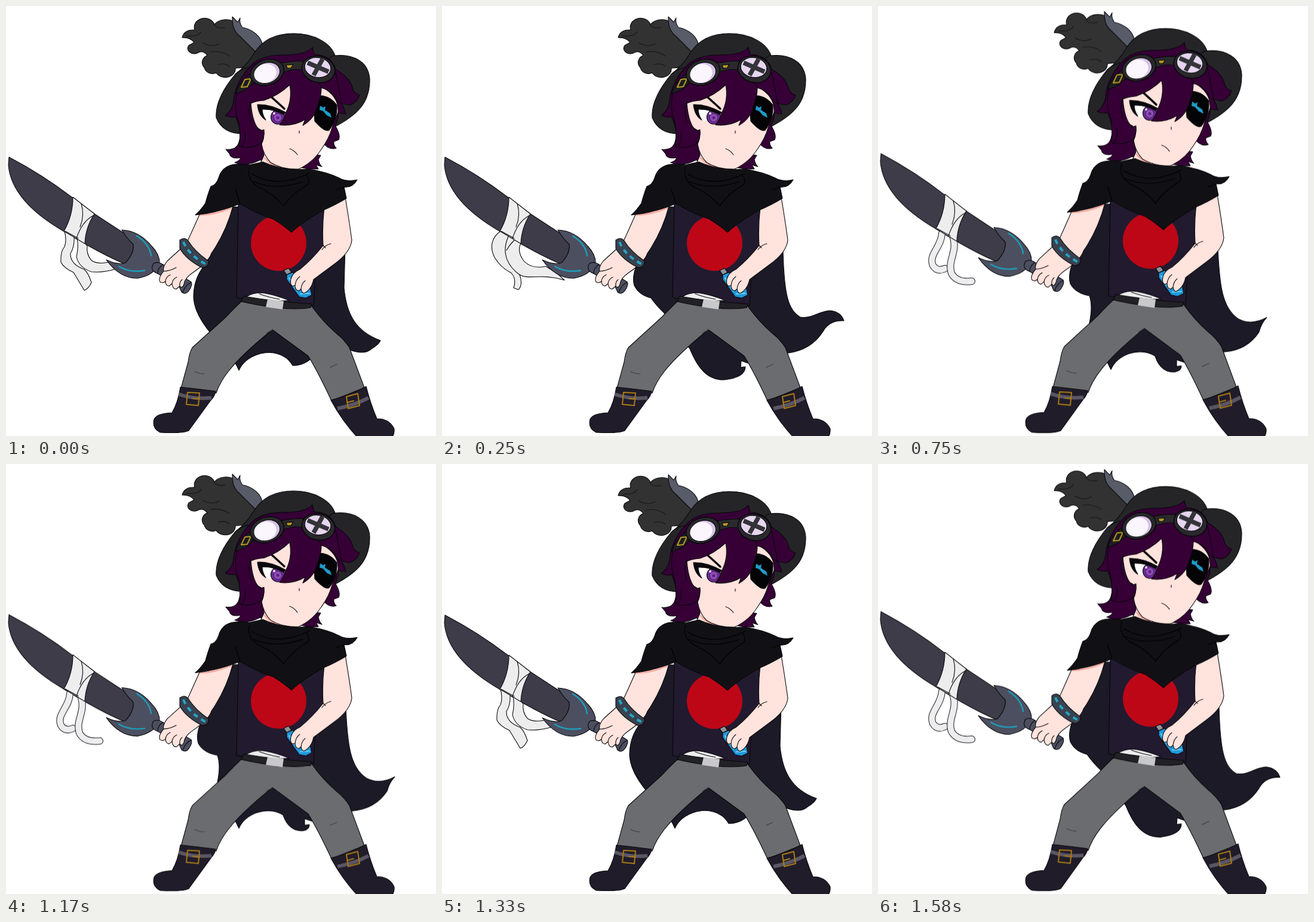
An HTML page that plays this animation: 720x720 px, repeating every 2010 ms.

```html
<!DOCTYPE html>
<html lang="en">
<head>
<meta charset="utf-8">
<title>Swordsman idle</title>
<style>
  html, body { margin: 0; width: 100%; height: 100%; overflow: hidden; background: #fff; }
  svg { display: block; width: 100%; height: 100%; }

  /* Every pose is held, then switched at once. */
  #figure, .pose { animation: 2010ms step-end infinite; }
  #figure { transform-origin: 0 720px; animation-name: breathe; }
  #cape-rest, #ribbon-rest { animation-name: rest; }
  #cape-gust { animation-name: cape-gust; }
  #cape-settle { animation-name: cape-settle; }
  #ribbon-gust { animation-name: ribbon-gust; }
  #ribbon-hang { animation-name: ribbon-hang; }

  @keyframes breathe {
    0% { transform: scaleY(1); }
    24.876% { transform: scaleY(1.0124); }
    58.209% { transform: scaleY(1.0014); }
    62.189% { transform: scaleY(1); }
    78.607%, 100% { transform: scaleY(1.0124); }
  }
  @keyframes rest {
    0%, 66.169% { opacity: 1; }
    12.438%, 78.607%, 100% { opacity: 0; }
  }
  @keyframes cape-gust {
    0%, 37.313% { opacity: 0; }
    12.438%, 78.607%, 100% { opacity: 1; }
  }
  @keyframes cape-settle {
    0%, 66.169%, 100% { opacity: 0; }
    37.313% { opacity: 1; }
  }
  @keyframes ribbon-gust {
    0%, 24.876%, 100% { opacity: 0; }
    12.438% { opacity: 1; }
  }
  @keyframes ribbon-hang {
    0%, 66.169% { opacity: 0; }
    24.876%, 78.607%, 100% { opacity: 1; }
  }

  #figure { stroke: #08070b; stroke-width: 1.1; stroke-linejoin: round; stroke-linecap: round; }
  .line { fill: none; }
  .cape { fill: #1c1a26; }
  .cloth { fill: #111115; }
  .skin { fill: #ffe3dc; }
  .hair { fill: #360036; }
  .hat { fill: #252528; }
  .boot { fill: #211c2a; }
  .steel { fill: #4c4f5f; }
  .white { fill: #ededee; }
  .glow { fill: none; stroke: #1d9fbd; stroke-width: 2.4; }
  .beads { fill: none; stroke: #25a5c8; stroke-width: 4; stroke-dasharray: 8 7; stroke-linecap: butt; }
  .gold { fill: none; stroke: #a87b16; stroke-width: 2; }
  .brass { fill: none; stroke: #b59a25; stroke-width: 2; }
  .blush { fill: none; stroke: #f8aaa0; stroke-width: 2.5; }
  .edge { fill: none; stroke: #1b1822; stroke-width: 12; }
  .tape { fill: none; stroke: #ededee; stroke-width: 10; }
</style>
</head>
<body>
<svg viewBox="0 0 720 720" preserveAspectRatio="none">
<g id="figure">

  <g class="cape">
    <path id="cape-rest" class="pose" d="M376 336L350 400L328 440Q314 460 314 488C316 522 345 550 366 576Q384 594 390 610Q398 592 420 584Q446 575 467 588Q474 592 480 602Q499 602 512 589L576 576Q600 585 612 574Q624 567 627 560C585 545 570 515 566 472L568 400L520 340Z"/>
    <path id="cape-gust" class="pose" d="M376 336L350 400L325 436Q318 455 322 468Q330 484 350 489Q360 503 372 514L415 574C428 606 444 626 472 626Q508 622 508 604L500 605L501 594L512 598L580 581Q618 576 638 545Q648 526 673 527Q668 512 650 510C630 511 620 524 600 521C580 510 573 485 571 410L520 340Z"/>
    <path id="cape-settle" class="pose" d="M376 336L350 400L325 436Q318 455 322 468Q331 484 354 488Q360 505 354 533L383 596L390 610Q398 592 420 584Q446 576 464 588C470 606 482 616 498 614Q508 612 508 604L500 605L500 594L512 598L580 581Q618 578 638 548Q642 533 651 524Q625 538 603 526C576 508 572 470 569 410L520 340Z"/>
  </g>

  <!-- legs -->
  <path fill="#6b6c6f" d="M397 492Q382 506 368 521L312 572Q307 580 305 596L293 640L352 648Q358 630 373 611Q395 583 446 542L506 586Q522 612 545 661L600 639L575 572Q566 558 553 548Q528 526 511 501Z"/>
  <path class="line" stroke="#3d3e42" d="M316 612Q324 616 332 616M543 605L554 600M446 542L436 548"/>
  <g class="boot">
    <path d="M292 638Q320 641 351 645Q350 653 343 660Q324 686 306 711Q296 716 258 714Q244 707 248 692Q253 682 278 681Q288 664 292 638Z"/>
    <path d="M544 660Q575 652 603 637Q610 665 621 691Q642 691 650 708Q651 717 645 724H590C575 708 559 688 544 660Z"/>
  </g>
  <path class="line" stroke="#5b5664" stroke-width="6" stroke-linecap="butt" d="M289 650Q315 659 344 656M555 674Q585 668 607 656"/>
  <path class="gold" d="M304 647L324 648L322 669L302 667ZM313 657L324 658M570 654L589 649L592 669L573 674ZM582 661L571 664"/>

  <!-- torso -->
  <path fill="#221a2f" d="M389 330L386 488Q440 501 515 502L517 462L531 400L532 338Z"/>
  <circle cx="456.500" cy="397" r="46.500" fill="#bd0717" stroke="none"/>
  <path class="white" d="M402 487Q416 478 434 481Q455 485 474 493Q440 496 402 490Z"/>
  <path class="line" d="M424 482Q440 488 458 491"/>
  <path fill="#222226" d="M398 486Q450 495 512 499L510 505Q470 512 394 495Z"/>
  <path fill="#c9c9cb" stroke="none" d="M438 491L465 494L463 508L435 504Z"/>

  <!-- right-hand side arm and bottle -->
  <path fill="#1e99dc" d="M470 450L480 446L510 474L512 484L502 489L491 487L470 458Z"/>
  <path fill="#92949b" d="M465 443L473 439L478 446L470 450Z"/>
  <path class="line" stroke="#76cff4" stroke-width="2" d="M474 455L488 477M493 482L508 481"/>
  <path class="skin" d="M533 336Q529 370 531 401Q513 424 492 441Q480 446 477 457Q475 467 480 469L484 468Q484 476 490 477L494 474Q496 483 501 480Q512 473 515 458L550 432Q577 412 579 392Q575 362 568 320Z"/>
  <path class="line" d="M529 408Q535 400 544 398M531 401L535 405M484 468Q485 458 492 453M494 474Q495 464 501 460"/>
  <path class="blush" d="M534 338L566 323"/>

  <!-- sword -->
  <path fill="#3e3c48" d="M5 253Q62 283 110 320L148 348L200 382L214 397Q214 420 199 432Q160 416 98 378C58 355 8 318 4 266Z"/>
  <g class="pose white" id="ribbon-rest">
    <path d="M98 377Q102 392 98 403Q91 411 92 429Q97 439 113 446Q122 461 131 476Q138 474 143 463Q138 447 131 441Q107 432 108 414Q115 403 114 386Z"/>
    <path d="M119 389Q122 402 118 420Q122 438 143 445Q163 447 185 440L172 429Q153 433 143 426Q134 415 136 402L132 397Z"/>
  </g>
  <g class="pose white" id="ribbon-gust">
    <path d="M98 377C82 388 80 405 88 421Q98 438 116 447Q125 457 120 472L128 475Q136 466 130 450C145 459 166 447 205 459L193 448L174 436Q150 441 137 427Q125 411 132 397Z"/>
    <path class="line" d="M111 386C98 416 112 437 130 450M121 392Q113 400 108 409"/>
  </g>
  <g class="pose" id="ribbon-hang">
    <path class="edge" d="M107 385C106 408 84 420 92 438Q99 449 112 443"/>
    <path class="tape" d="M107 385C106 408 84 420 92 438Q99 449 112 443"/>
    <path class="edge" d="M126 392C133 416 116 430 123 451Q132 467 157 464"/>
    <path class="tape" d="M126 392C133 416 116 430 123 451Q132 467 157 464"/>
  </g>
  <path class="white" d="M112 320L148 348Q133 371 132 398L97 377Q112 351 112 320Z"/>
  <path class="line" d="M146 351Q127 361 118 389M126 331Q132 350 124 370M99 377L121 389"/>
  <path class="steel" d="M194 375Q222 376 244 402Q258 417 257 431Q248 451 220 456Q190 456 168 425Q187 434 200 430Q215 414 213 399Q202 389 194 375Z"/>
  <path class="glow" d="M219 385Q240 398 243 418M189 436Q207 447 232 443"/>
  <path class="steel" d="M247 431Q255 427 263 433L310 462Q313 467 306 477Q301 484 294 479L290 470L254 448Q240 443 247 431Z"/>
  <path class="line" d="M263 433Q254 438 254 448M310 463Q301 466 296 479"/>

  <!-- left-hand side arm -->
  <path class="skin" d="M325 347Q313 374 302 398L270 427Q262 437 264 444Q254 456 258 462Q263 465 267 461Q267 468 273 469L278 465Q279 474 285 474L291 469Q295 474 298 466Q299 456 312 447Q340 428 344 414Q369 378 380 335Z"/>
  <path class="line" d="M264 444Q274 444 285 438M267 461Q268 453 275 450M278 465Q279 457 286 454M291 469Q290 462 295 458"/>
  <path class="blush" d="M325 350Q350 350 377 338"/>
  <path fill="#39424f" d="M291 392Q299 386 305 393Q316 411 339 427Q340 438 328 438Q302 425 291 406Z"/>
  <path class="beads" d="M297 395Q306 417 334 432"/>

  <!-- back hair and hat -->
  <path fill="#323232" d="M295 53Q298 39 316 40A17 15 0 0 1 349 31A22 16 0 0 1 383 27Q398 45 421 73L415 90Q409 104 384 104A17 14 0 0 1 352 112A14 13 0 0 1 332 103A12 12 0 0 1 337 83Q331 74 322 78A11 9 0 0 1 306 66L315 61Q308 52 295 53Z"/>
  <path class="line" stroke="#171717" d="M302 50Q322 52 327 43M330 62Q345 70 357 63M342 77Q361 74 374 84M355 98Q367 95 374 101M348 31Q354 39 367 36"/>
  <path fill="#585c69" d="M379 18Q378 40 391 50L418 77L430 68C428 50 412 39 396 36Q390 28 392 20L388 27Z"/>
  <path class="hat" d="M416 78C430 56 454 46 482 46C516 46 544 62 551 83C581 80 607 93 609 122C610 164 585 184 551 202L480 150L410 213Q365 219 352 187C350 160 369 132 384 114Q403 100 416 78Z"/>
  <path class="line" d="M551 83Q546 83 541 88M384 114Q394 106 405 103"/>
  <path class="hair" d="M411 99Q427 82 463 82Q503 82 513 69L516 81Q545 82 552 106Q577 120 581 140Q585 148 592 149Q588 162 575 166L562 163Q568 174 569 181L556 179Q557 190 551 200Q561 216 557 224L549 227Q548 233 553 238Q540 242 530 228L514 248Q521 250 527 250L523 257Q525 266 529 269L519 266L523 273H507L425 258Q402 270 383 262Q392 259 393 254Q376 257 374 247L368 240Q386 242 390 228Q396 210 384 185Q378 188 367 183Q381 174 382 151Q388 122 411 99Z"/>

  <!-- face -->
  <path class="skin" d="M428 230L432 250L424 268L465 279L500 267Z"/>
  <path class="blush" stroke-width="5" d="M433 254Q440 264 455 269"/>
  <path class="skin" d="M410 155C407 182 415 203 426 207Q436 214 428 231Q431 250 443 262Q462 274 490 273Q514 262 528 240Q541 222 546 204L556 178Q558 152 530 136L475 124Z"/>
  <path fill="#fff" stroke="none" d="M428 172L462 177L462 193L437 192Q430 184 428 172Z"/>
  <ellipse cx="455" cy="186" rx="11.500" ry="12" fill="#6e2c93"/>
  <circle cx="455" cy="187" r="7" fill="#8e4fb5" stroke="#4c1b6d"/>
  <circle cx="455" cy="187" r="2.500" fill="#5a2180" stroke="none"/>
  <circle cx="449" cy="180" r="2" fill="#efddf7" stroke="none"/>
  <path fill="#09070b" d="M421 165Q443 164 468 178L465 182Q447 172 429 173Q429 182 435 191Q423 184 421 165Z"/>
  <path class="line" stroke-width="3.500" d="M444 152Q453 160 466 172"/>
  <path class="line" d="M491 209L491 213M475 239Q482 241 488 249"/>
  <path fill="#040406" d="M527 150Q543 151 554 166Q555 190 541 208Q534 212 517 193L516 178Z"/>
  <path fill="#1f9bc9" stroke="none" d="M526 167L531 170L535 168L534 174L543 180L545 187L537 183L531 176L525 174Z"/>

  <!-- front hair -->
  <path class="hair" d="M404 117C386 132 378 164 390 195Q393 222 391 235Q408 240 425 231Q434 222 432 207L426 209Q413 199 410 163Q418 159 432 158Q456 150 475 132Q480 157 468 180Q465 191 458 199Q481 202 501 190L497 200Q517 189 522 166Q528 151 528 137Q548 142 555 160L562 163L552 112L470 100Z"/>
  <path class="line" d="M410 160Q404 178 410 195M400 211Q403 225 395 235M528 137Q524 126 516 119"/>

  <!-- goggles -->
  <path fill="#1d1d20" d="M385 147Q389 127 411 112L419 126Q405 136 402 140Z"/>
  <path class="brass" d="M400 123L410 122L404 135L394 136Z"/>
  <path fill="#2a2a2d" d="M459 96Q477 92 498 92L499 107Q479 104 462 112Z"/>
  <path fill="#b79b25" d="M469 99L481 98L477 104L471 104Z"/>
  <g fill="#29292c" stroke-width="1.500">
    <ellipse cx="437" cy="111" rx="29" ry="21" transform="rotate(-18 437 111)"/>
    <ellipse cx="523" cy="106" rx="28" ry="22" transform="rotate(14 523 106)"/>
  </g>
  <ellipse cx="437" cy="112" rx="22" ry="17" fill="#d7c3e6" transform="rotate(-18 437 112)"/>
  <ellipse cx="434" cy="113" rx="19" ry="15.500" fill="#fbf6fd" stroke="none" transform="rotate(-18 434 113)"/>
  <ellipse cx="522" cy="103" rx="22" ry="16.500" fill="#e6d6f0" transform="rotate(10 522 103)"/>
  <path class="line" stroke="#343438" stroke-width="7.500" stroke-linecap="butt" d="M505 95L540 110M530 89L515 116"/>

  <!-- mantle and scarf -->
  <path class="cloth" d="M408 266C381 262 362 266 356 288Q352 300 343 302Q337 318 334 330Q326 342 317 350Q352 347 392 331Q420 348 448 357Q467 369 478 379Q496 362 531 342Q552 333 570 322L566 303Q580 305 588 291Q570 295 558 288Q538 278 507 273Q465 277 430 261Z"/>
  <path class="line" stroke="#000" d="M408 270Q402 290 422 303Q449 315 465 335Q478 315 505 299Q510 292 503 283M411 281Q454 307 508 280M414 294Q452 310 497 294M392 331L384 307M566 303L552 308"/>
</g>
</svg>
</body>
</html>
```
